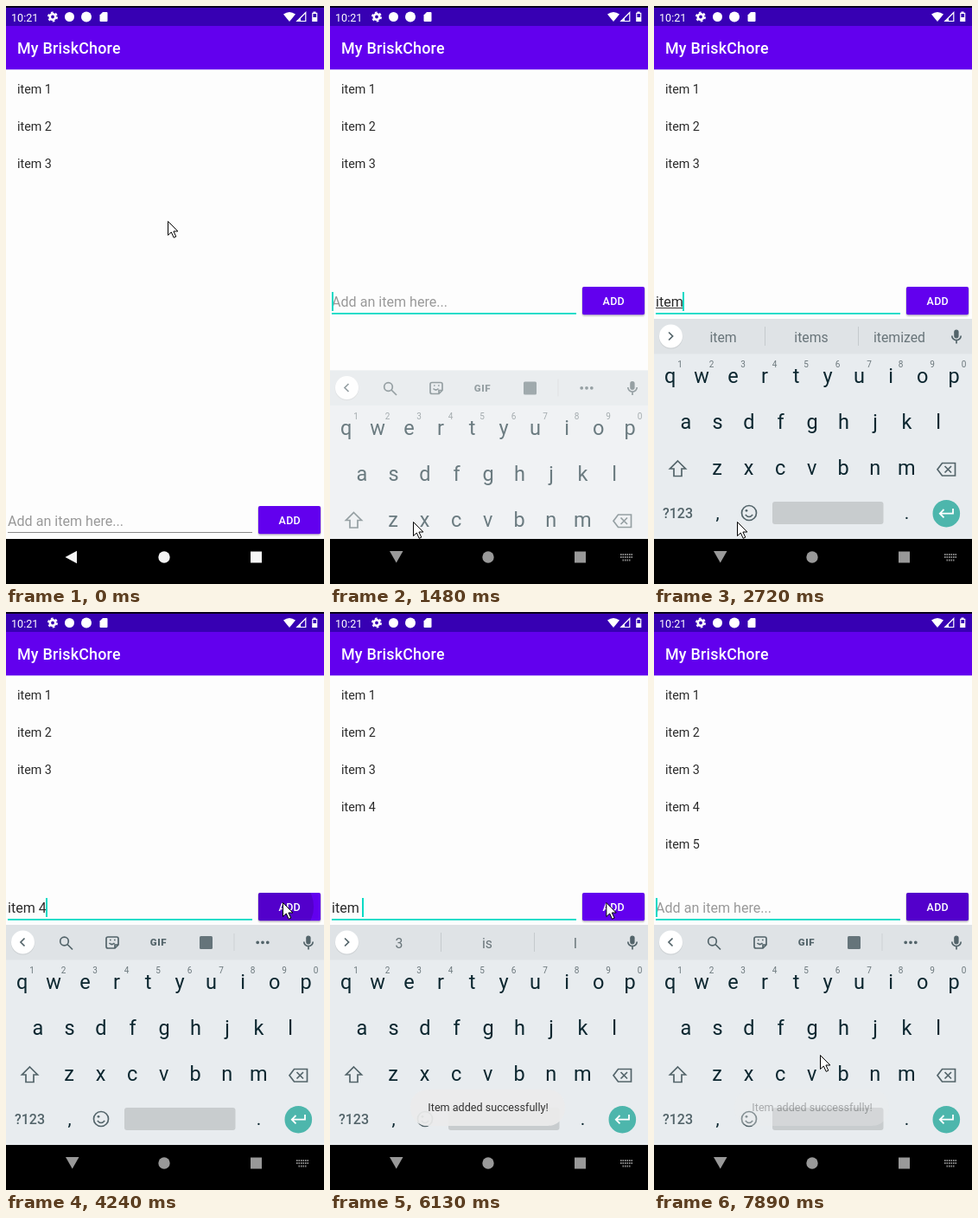
An HTML page that plays this animation: 368 by 667 pixels, repeating every 8 s.

```html
<!DOCTYPE html>
<html lang="en">
<head>
<meta charset="utf-8">
<title>Todo list</title>
<style>
html, body { margin: 0; height: 100%; overflow: hidden; background: #fdfdfd; }
svg { display: block; width: 100vw; height: 100vh; font-family: Roboto, sans-serif; }
text { white-space: pre; }
.mid { text-anchor: middle; }
.line { fill: none; stroke: #53646a; stroke-width: 1.7; }
</style>
</head>
<body>
<svg viewBox="0 0 368 667">
  <defs><clipPath id="btnClip"><rect x="292" y="324" width="72" height="32.3" rx="2"/></clipPath></defs>
  <rect width="368" height="667" fill="#fdfdfd"/>
  <rect y="23" width="368" height="50.3" fill="#6200ee"/>
  <rect width="368" height="23" fill="#3700b3"/>
  <rect width="368" height="2" fill="#08001c"/>

  <!-- status bar -->
  <g fill="#fff">
    <text x="6" y="17.5" font-size="12.6">10:21</text>
    <circle cx="54" cy="12.5" r="3.2" fill="none" stroke="#fff" stroke-width="2.6"/>
    <circle cx="54" cy="12.5" r="5.1" fill="none" stroke="#fff" stroke-width="1.8" stroke-dasharray="2.67"/>
    <circle cx="73.5" cy="12.5" r="5.5"/>
    <circle cx="93" cy="12.5" r="6"/>
    <path d="M112 7h4.5q1 0 1 1v9q0 1-1 1h-7q-1 0-1-1v-6.5z"/>
    <path d="M321 9.5q7-5 14 0l-7 8.5z"/>
    <path d="M346.8 7.5v10h-10z" fill="none" stroke="#fff" stroke-width="1.2"/>
    <path d="M341 13.5v4h-4z"/>
    <path d="M355.5 6.5h3v1.3h1.8v10.2h-6.1v-10.2h1.3z"/>
    <path d="M355.4 9h3.7v4h-3.7z" fill="#3700b3"/>
    <text x="13" y="55" font-size="17.9" font-weight="500" letter-spacing=".2">My BriskChore</text>
  </g>

  <g id="list" font-size="14.3" fill="#2b2b2b"></g>

  <g id="entry">
    <text id="field" x="2" y="347" font-size="16.1"></text>
    <rect id="compose" x="2" y="348" height="1" fill="#333"/>
    <rect id="rule" x="2" y="354" width="283"/>
    <rect id="caret" y="330" width="2" height="22" fill="#03dac5"/>
    <rect x="291" y="324" width="74" height="35" rx="4" opacity=".07"/>
    <rect x="291.5" y="324" width="73" height="33.5" rx="3" opacity=".15"/>
    <g clip-path="url(#btnClip)">
      <rect x="292" y="324" width="72" height="33" fill="#6200ee"/>
      <circle id="ripple" cx="320" cy="340"/>
    </g>
    <text class="mid" x="328.3" y="345" font-size="12.5" font-weight="500" letter-spacing=".3" fill="#fff">ADD</text>
  </g>

  <g id="keyboard">
    <rect y="361" width="368" height="255" fill="#e8ecef"/>
    <rect y="361" width="368" height="40.5" fill="#dfe3e6"/>
    <circle cx="19.5" cy="382" r="13.8" fill="#cfd3d6"/>
    <circle cx="19.5" cy="381" r="13.5" fill="#fff"/>
    <path id="chevron" class="line" d="M21.5 376.5l-4.5 4.5 4.5 4.5"/>
    <g id="tools">
      <circle class="line" cx="67.5" cy="380" r="4.8"/>
      <path class="line" d="M71 383.5l6 6"/>
      <path class="line" d="M118 375h10q2 0 2 2v7l-4 4h-8q-2 0-2-2v-9q0-2 2-2zM130 384h-4v4M119.5 382q3 3 6 0M120 378.5h1.6M125 378.5h1.6"/>
      <text class="mid" x="176.5" y="385.2" font-size="11.5" font-weight="900" letter-spacing=".7" fill="#53646a">GIF</text>
      <rect x="224" y="374" width="15" height="15" rx="1.5" fill="#65747a"/>
      <path d="M264 371v20" stroke="#cdd1d4"/>
      <path d="M291.2 381.3h12" stroke="#53646a" stroke-width="3.8" stroke-linecap="round" stroke-dasharray="0 5.8"/>
    </g>
    <g id="words" class="mid" font-size="15.8" fill="#687479">
      <path d="M128.5 370v22M236.5 370v22" stroke="#c5cacd"/>
    </g>
    <rect x="347.2" y="373.5" width="5.4" height="10" rx="2.7" fill="#53646a"/>
    <path class="line" d="M344.8 380.5a5.2 5.2 0 0 0 10.4 0M350 386v3.5"/>
    <g id="keys" class="mid" font-size="23.5" fill="#0c2730"></g>
    <path class="line" d="M27.5 525l9 9h-4.5v8.5h-9v-8.5h-4.5z"/>
    <path class="line" d="M333.5 527.5h15v14.5h-15l-5.5-7.2zM336.5 531l7.5 7.5M344 531l-7.5 7.5"/>
    <text class="mid" x="27.5" y="591" font-size="16" font-weight="500" fill="#53646a">?123</text>
    <g class="line"><circle cx="110" cy="585" r="8.5"/><path d="M105.8 587q4.2 5 8.4 0"/></g>
    <path d="M107 582.3h6" stroke="#53646a" stroke-width="2.8" stroke-linecap="round" stroke-dasharray="0 6"/>
    <rect x="137" y="572" width="128.5" height="26" rx="3" fill="#c8ccce"/>
    <circle cx="338.3" cy="585.7" r="15.8" fill="#4db6ac"/>
    <path d="M346 580v5.7h-15M335.5 581l-4.7 4.7 4.7 4.7" fill="none" stroke="#fff" stroke-width="1.8"/>
  </g>

  <g id="toast">
    <rect x="93" y="551" width="179" height="42" rx="20" fill="#ececec" opacity=".92"/>
    <text class="mid" x="183" y="576" font-size="12.6" fill="#333">Item added successfully!</text>
  </g>

  <rect y="615" width="368" height="52"/>
  <g id="nav">
    <path id="back"/>
    <circle cx="183" cy="636" r="6.7"/>
    <rect x="283" y="629.5" width="13" height="13"/>
  </g>
  <path id="switcher" d="M336 633h14M336 636h14M338.5 639.5h9" stroke="#888" stroke-width="1.8" stroke-dasharray="1.6 .9"/>

  <path id="mouse" d="M.5.5v16l3.8-3.5 2.9 6.3 2.6-1.2-2.9-6.1h5z" fill="#fff" stroke="#000"/>
</svg>
<script>
const $ = id => document.getElementById(id);
const set = (el, attrs) => { for (const k in attrs) el.setAttribute(k, attrs[k]); };
const show = (el, on) => { el.style.display = on ? '' : 'none'; };
const clamp = v => Math.min(1, Math.max(0, v));
const within = (t, from, to) => t >= from && t < to;
function addText(parent, x, y, str, attrs = {}) {
  const el = document.createElementNS('http://www.w3.org/2000/svg', 'text');
  set(el, { x, y, ...attrs });
  el.textContent = str;
  return parent.appendChild(el);
}

const items = [1, 2, 3, 4, 5].map(n => addText($('list'), 13, 57.5 + 43 * n, 'item ' + n));
const slots = [80, 182, 284].map(x => addText($('words'), x, 387.5, ''));
[['qwertyuiop', 18.6], ['asdfghjkl', 37], ['zxcvbnm', 73.2]].forEach(([row, x], r) =>
  [...row].forEach((c, i) => addText($('keys'), x + 36.5 * i, 435 + 53 * r, c)));
[...'1234567890'].forEach((c, i) =>
  addText($('keys'), 30 + 36.5 * i, 417, c, { 'font-size': 10, fill: '#6b777c' }));
addText($('keys'), 73.5, 592, ',', { 'font-size': 21 });
addText($('keys'), 292.5, 592, '.', { 'font-size': 21 });

const FOCUS = 1480;     // field tapped, keyboard opens
const KEY = 120;        // ms per typed letter
const STEP = 130;       // ms between pointer updates
// Each round types "item n", presses the button and adds the item.
const rounds = [
  { n: 4, type: 2480, space: 2840, digit: 2960, press: 4120, add: 4390 },
  { n: 5, type: 5460, space: 6130, digit: 6820, press: 7620, add: 7890 },
];
const edits = [FOCUS, ...rounds.flatMap(r => [r.type, r.type + 2 * KEY, r.space, r.digit, r.add])];
// Pointer key points: time, x, y
const path = [
  [280, 187, 248], [520, 38, 300], [780, 168, 240], [1040, 80, 620], [1300, 96, 595],
  [3640, 96, 595], [3900, 307, 333], [4160, 320, 335], [7150, 319, 335],
  [7280, 357, 334], [7540, 322, 335], [7670, 322, 335], [7800, 192, 511],
];

function pointer(t) {
  t = Math.floor(t / STEP) * STEP;
  const i = path.findIndex(p => p[0] > t);
  if (i < 0) return path.at(-1).slice(1);
  if (i === 0) return path[0].slice(1);
  const [a, b] = [path[i - 1], path[i]], k = (t - a[0]) / (b[0] - a[0]);
  return [1, 2].map(j => a[j] + (b[j] - a[j]) * k);
}

function typed(t) {
  const r = rounds.find(r => within(t, r.type, r.add));
  if (!r) return '';
  if (t >= r.digit) return 'item ' + r.n;
  if (t >= r.space) return 'item ';
  return 'item'.slice(0, 2 + Math.floor((t - r.type) / KEY));
}

function suggest(text) {
  if (!text || /\d/.test(text)) return null;
  if (text.endsWith(' ')) return ['3', 'is', 'I'];
  return text === 'item' ? ['item', 'items', 'itemized'] : [text, 'item', 'items'];
}

// Time since the latest round reached a stage, or Infinity
const since = (stage, t) => Math.min(...rounds.map(r => t >= r[stage] ? t - r[stage] : Infinity));

function draw(t) {
  const open = t >= FOCUS, text = typed(t), words = suggest(text);

  items.forEach((el, i) => show(el, rounds.every(r => r.n !== i + 1 || t >= r.add)));
  set($('entry'), { transform: `translate(0 ${open ? 0 : 253})` });
  const field = $('field');
  field.textContent = text || 'Add an item here...';
  set(field, { fill: text ? '#2b2b2b' : '#999' });
  const width = text ? field.getComputedTextLength() : 0;
  set($('compose'), { width: /^\w+$/.test(text) ? width : 0 });
  set($('rule'), open ? { height: 1.8, fill: '#03dac5' } : { height: 1, fill: '#8b8b8b' });
  set($('caret'), { x: Math.round(1.5 + width) });
  const idle = t - edits.findLast(e => e <= t);
  show($('caret'), open && idle % 1000 < 500);

  const held = since('press', t);
  set($('ripple'), held < 600
    ? { r: 18 + held * .15, opacity: .15 * clamp((510 - held) / 200) } : { r: 0 });

  show($('tools'), !words);
  show($('words'), words);
  if (words) slots.forEach((el, i) => { el.textContent = words[i]; });
  set($('chevron'), { transform: words ? 'rotate(180 19.3 381)' : '' });

  const drop = 1 - clamp((t - FOCUS) / KEY);
  show($('keyboard'), open);
  set($('keyboard'), { transform: `translate(0 ${60 * drop})`, opacity: 1 - .4 * drop });

  const age = since('add', t);
  set($('toast'), { opacity: clamp(Math.min(.35 + age / 600, (2550 - age) / 540)) });

  const grey = 245 - 92 * clamp((t - 100) / 440);
  set($('nav'), { fill: `rgb(${grey},${grey},${grey})` });
  set($('back'), { d: open ? 'M69 629h15.5l-7.75 13.5z' : 'M68.5 636l13.5-7.3v14.6z' });
  show($('switcher'), open);
  set($('mouse'), { transform: `translate(${pointer(t)})` });
  show($('mouse'), !within(t, 3670, 3980));
}

function tick() {
  draw(performance.now() % 8000);
  requestAnimationFrame(tick);
}
tick();
</script>
</body>
</html>
```
